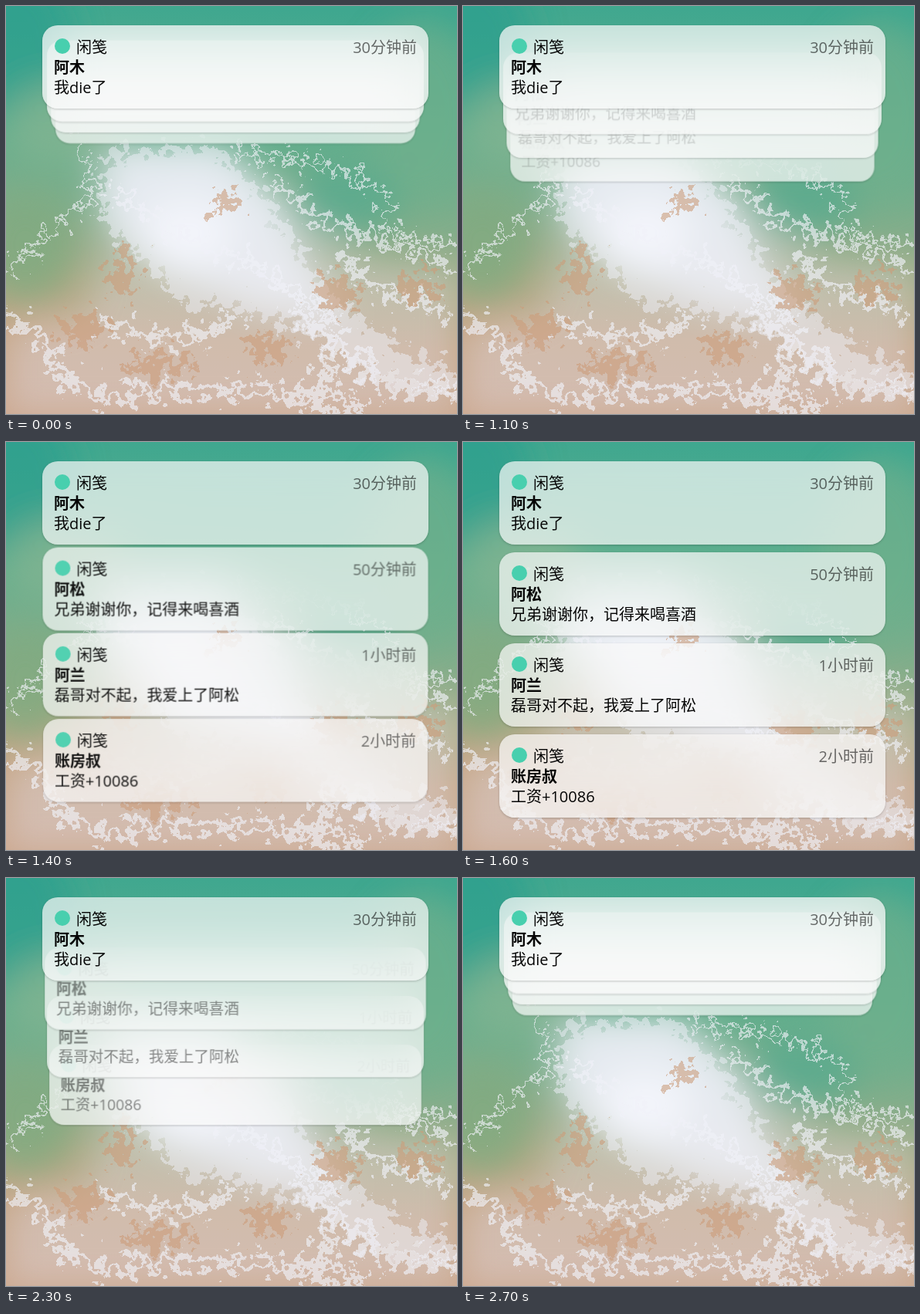
Write an HTML page that moves like this. It is 584 px wide and 529 px high and loops after 3.2 s.

```html
<!DOCTYPE html>
<html lang="zh-CN">
<head>
<meta charset="utf-8">
<title>通知</title>
<style>
html, body { margin: 0; width: 100%; height: 100%; overflow: hidden; }
body { position: relative; background: #6db191; }
.beach { position: absolute; left: 0; top: 0; width: 584px; height: 529px; }
.card {
  position: absolute; left: 47px; width: 500px; height: 108px;
  border-radius: 20px; transform-origin: 50% 100%;
  background: rgba(250, 250, 250, .7);
  -webkit-backdrop-filter: blur(30px); backdrop-filter: blur(30px);
  box-shadow: 0 1px 3px rgba(0, 0, 0, .2);
  font: 20px/26px "Open Sans", "Noto Sans CJK SC", "Noto Sans CJK", sans-serif;
  color: #050505; white-space: nowrap;
}
.text { position: absolute; inset: 16px 15px 0; }
.head { position: relative; padding-left: 29px; display: flex; justify-content: space-between; }
.head::before {
  content: ""; position: absolute; left: 1px; top: 1px; width: 20px; height: 20px;
  border-radius: 50%; background: #48cfae;
}
.when { color: rgba(0, 0, 0, .57); }
.from { font-weight: 700; }
</style>
</head>
<body>
<svg class="beach" viewBox="0 0 584 529">
  <defs>
    <linearGradient id="shore" x1=".5" y1="0" x2=".45" y2="1">
      <stop offset="0" stop-color="#3fa78f"/>
      <stop offset=".3" stop-color="#5fae8d"/>
      <stop offset=".52" stop-color="#82ae8b"/>
      <stop offset=".68" stop-color="#a9aa84"/>
      <stop offset=".82" stop-color="#c5a585"/>
      <stop offset="1" stop-color="#cba78d"/>
    </linearGradient>
    <filter id="soft" x="-50%" y="-50%" width="200%" height="200%">
      <feGaussianBlur stdDeviation="22"/>
    </filter>
    <filter id="ragged" filterUnits="userSpaceOnUse" x="-60" y="-60" width="704" height="649">
      <feTurbulence type="fractalNoise" baseFrequency=".075" numOctaves="4" seed="8"/>
      <feDisplacementMap in="SourceGraphic" scale="72" xChannelSelector="R" yChannelSelector="G"/>
      <feGaussianBlur stdDeviation=".7"/>
    </filter>
  </defs>
  <rect width="584" height="529" fill="url(#shore)"/>
  <g filter="url(#soft)">
    <ellipse cx="10" cy="50" rx="80" ry="100" fill="#2a9f8e" opacity=".7"/>
    <ellipse cx="75" cy="155" rx="80" ry="55" fill="#84b591" opacity=".8"/>
    <ellipse cx="540" cy="140" rx="80" ry="120" fill="#6fb08c" opacity=".7"/>
    <ellipse cx="440" cy="250" rx="70" ry="45" fill="#58aa8e" opacity=".8"/>
    <ellipse cx="25" cy="310" rx="60" ry="70" fill="#7fab80" opacity=".8"/>
    <path d="M110 180L300 180L390 270L470 330L584 340V529H0V420L100 400L125 320Z" fill="#e0dce2" opacity=".42"/>
    <path d="M140 190L270 185L350 250L390 340L440 400L330 390L200 340L130 270Z" fill="#f1f2fb" opacity=".75"/>
    <ellipse cx="235" cy="295" rx="60" ry="45" fill="#fafbff" opacity=".9"/>
  </g>
  <g filter="url(#ragged)">
    <path d="M130 190L265 180L330 240L375 310L430 380L520 450L584 475V500L470 475L370 415L300 390L230 390L180 330L125 280Z" fill="#eeeff8" opacity=".5"/>
    <g fill="none" stroke="#f0f1f8" stroke-linecap="round" opacity=".65">
      <path d="M300 190L420 205L485 240L500 300L584 310M0 340L60 295L115 235L95 180" stroke-width="6"/>
      <path d="M350 230L400 275L500 310L584 345M140 240L230 300L330 340L430 410" stroke-width="10"/>
      <path d="M0 400L45 430L70 480L130 510L220 495L330 500L460 520" stroke-width="14"/>
      <path d="M130 410L190 430L240 430L290 410M440 330L490 370L570 400" stroke-width="13"/>
      <path d="M380 400L430 440L490 490L584 500M420 450L400 529" stroke-width="17"/>
    </g>
    <g fill="#cb9d7c" opacity=".6">
      <ellipse cx="427" cy="372" rx="27" ry="20"/>
      <ellipse cx="150" cy="350" rx="15" ry="34"/>
      <ellipse cx="285" cy="255" rx="18" ry="13"/>
      <ellipse cx="340" cy="445" rx="27" ry="20"/>
      <ellipse cx="200" cy="465" rx="45" ry="12"/>
      <ellipse cx="535" cy="365" rx="25" ry="16"/>
      <ellipse cx="100" cy="420" rx="28" ry="18"/>
    </g>
  </g>
</svg>
<script>
const LOOP = 3200, TOP = 25, HEIGHT = 108, PITCH = 118;

// [time in ms, how far the stack is open], held until the next entry
const STEPS = [
  [0, 0], [1100, .16], [1200, .56], [1300, .81], [1400, .934], [1500, .985], [1600, 1],
  [2200, .85], [2300, .46], [2400, .2], [2500, .07], [2600, .018], [2700, 0], [LOOP, 0]
];

// bottom and scale describe each card while the stack is closed
const CARDS = [
  { from: "阿木", text: "我die了", when: "30分钟前", bottom: 133, scale: 1 },
  { from: "阿松", text: "兄弟谢谢你，记得来喝喜酒", when: "50分钟前", bottom: 150, scale: .976 },
  { from: "阿兰", text: "磊哥对不起，我爱上了阿松", when: "1小时前", bottom: 164, scale: .955 },
  { from: "账房叔", text: "工资+10086", when: "2小时前", bottom: 178, scale: .932 }
];

function play(element, pose) {
  const frames = STEPS.map(([time, open]) =>
    ({ offset: time / LOOP, easing: "steps(1, end)", ...pose(open) }));
  element.animate(frames, { duration: LOOP, iterations: Infinity });
}

function addCard({ from, text, when, bottom, scale }, index) {
  const top = TOP + PITCH * index;
  const shift = bottom - (top + HEIGHT);
  const card = document.createElement("div");
  card.className = "card";
  card.style.top = top + "px";
  card.style.zIndex = CARDS.length - index;
  card.innerHTML = `<div class="text">
    <div class="head"><span>闲笺</span><span class="when">${when}</span></div>
    <div class="from">${from}</div>
    <div>${text}</div>
  </div>`;
  document.body.append(card);
  if (index === 0) return;
  play(card, open => ({
    transform: `translateY(${shift * (1 - open)}px) scale(${scale + (1 - scale) * open})`
  }));
  play(card.firstChild, open => ({ opacity: open }));
}

CARDS.forEach(addCard);
</script>
</body>
</html>
```
